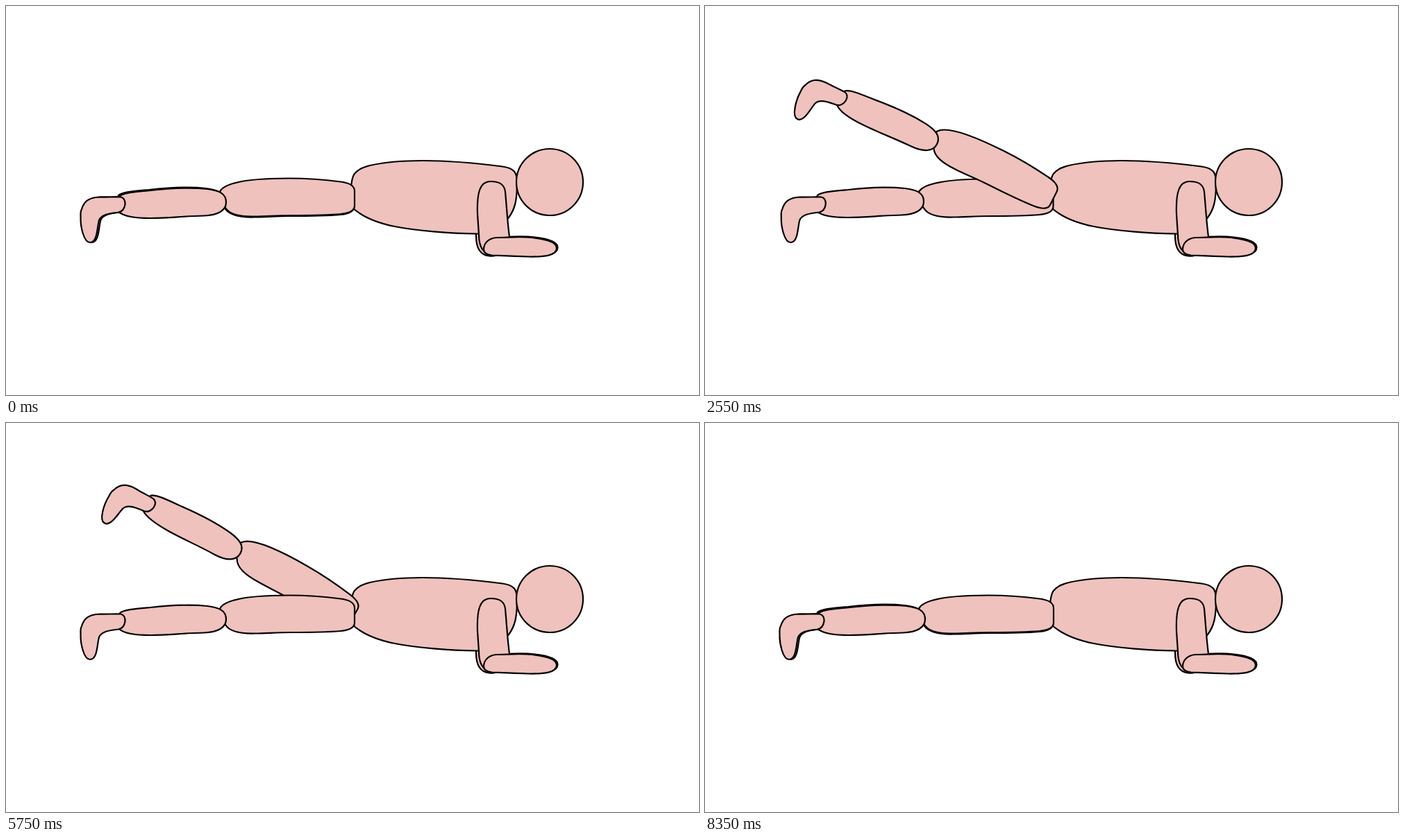
Recreate the animation shown at these times as an HTML page. Size 998x561 px, loop 8400 ms.

```html
<!DOCTYPE html>
<html lang="en">
<head>
<meta charset="utf-8">
<title>Plank leg raise</title>
<style>
  html, body { margin: 0; width: 100%; height: 100%; overflow: hidden; background: #fff; }
  svg { display: block; width: 100%; height: 100%; }
</style>
</head>
<body>
<svg viewBox="0 0 998 561" fill="#efc2bd" stroke="#000" stroke-width="2.2" stroke-linejoin="round">
  <defs>
    <path id="thigh" d="M316 291C322 301 338 304 358 303.500C375 303.500 388 302 410 302C450 302 470 301 482 300Q502 298 502 288V267Q502 256 482 253.500C455 250 432 248.500 408 248.500C370 248.500 320 251 309 266Q304 275 316 291Z"/>
    <path id="calf" d="M163 297Q172 306 208 306C235 306 255 303 285 302.500C305 302 317 295 317 283C317 270 306 266 290 264C262 261 235 263 208 266C185 268 170 269 164 274Q158 285 163 297Z"/>
    <path id="foot" d="M135 275.500C146 276 155 275 165 275.500Q172 277 171.500 286Q170 296 162 297.500C148 299 137 301 134 309C131 319 132 341 121 341C112 341 107 318 107.500 304Q107 296 109 293C112 283 118 276 135 275.500Z"/>
    <path id="arm" d="M679 300C678 270 682 253 698 253C712 253 718 258 719 268C721 290 722 310 725 333C726 350 712 360 700 358.500C686 357 681 346 681 330Z"/>
    <path id="forearm" d="M688 351C688 342 695 335 706 334C720 334 735 332.500 750 333.500C775 335 793 340 793 349C793 360 775 362 752 361.500C730 361 712 360 700 359.500Q688 358 688 351Z"/>
  </defs>
  <use href="#arm" x="-4" y="2"/>
  <use href="#forearm" x="1.500" y="-.8"/>
  <path d="M497 262C498 245 500 236 524 230C550 224 580 223 600 223C640 223 680 227 715 231.500C732 234 736 240 736 255C736 280 733 293 724 305C712 320 700 329 678 328.500C640 328 590 324 560 318C530 312 512 303 499 291Q494 280 497 262Z"/>
  <circle cx="783" cy="254" r="48"/>
  <g id="farLeg">
    <use href="#thigh" x="-.5" y="1"/>
    <use href="#calf" x="-2" y="-1"/>
    <use href="#foot" x="2.300"/>
  </g>
  <g id="nearLeg">
    <use href="#thigh"/>
    <use href="#calf"/>
    <use href="#foot"/>
  </g>
  <use href="#arm"/>
  <use href="#forearm"/>
</svg>
<script>
  const LOOP = 8400, STEP = 50, HALF = 2000, LIFT = 30.7;
  const nearLeg = document.getElementById('nearLeg');
  const farLeg = document.getElementById('farLeg');

  // Linear departure from the floor, smooth stop at the top, mirrored on the way down.
  function angle(t) {
    const u = Math.max(0, 1 - Math.abs(t - HALF) / HALF);
    return LIFT * (u + u * u - u * u * u);
  }

  function pose(leg, t) {
    leg.setAttribute('transform', `rotate(${angle(t)} 502 277)`);
  }

  const start = performance.now();
  function draw() {
    const elapsed = (performance.now() - start) % LOOP;
    const t = Math.floor(elapsed / STEP) * STEP;
    pose(nearLeg, t);
    pose(farLeg, t - 2 * HALF);
    requestAnimationFrame(draw);
  }
  draw();
</script>
</body>
</html>
```
